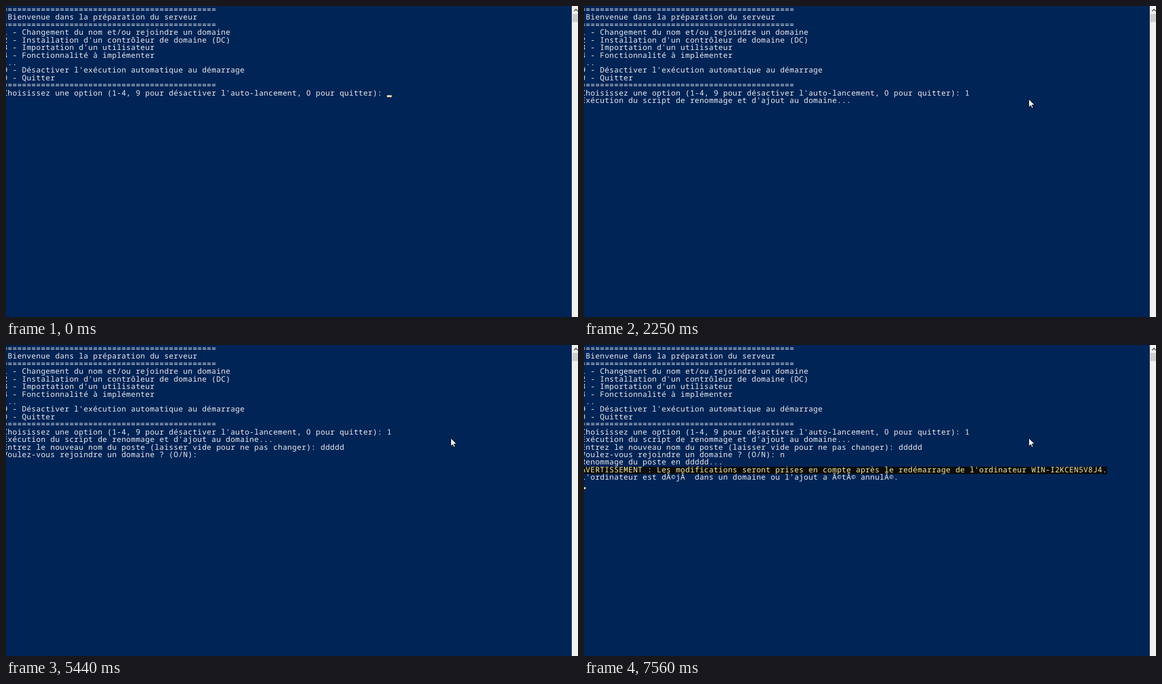
An HTML page that plays this animation: 1015x552 px, repeating every 8 s.

```html
<!DOCTYPE html>
<html lang="fr">
<head>
<meta charset="utf-8">
<title>Préparation du serveur</title>
<style>
  html, body { margin: 0; width: 100%; height: 100%; overflow: hidden; background: #012456; }
  svg { display: block; }
  text {
    font: 13.3px "Noto Sans Mono", "DejaVu Sans Mono", monospace;
    fill: #eeedf0;
    white-space: pre;
    text-rendering: geometricPrecision;
  }
  .zero { font-family: "Noto Sans", sans-serif; }
  .warn { fill: #f9f1a5; }
</style>
</head>
<body>
<svg width="1015" height="552" viewBox="0 0 1015 552">
  <rect width="1015" height="552" fill="#012456"/>
  <rect id="band" y="216" width="928" height="13" fill="#0c0c0c"/>
  <g id="rows"></g>
  <rect id="caret" height="3.4" fill="#fedba9"/>
  <g id="scrollbar">
    <rect x="1004" width="11" height="552" fill="#f0f0f0"/>
    <rect x="1005" y="14" width="10" height="14.5" fill="#cdcdcd"/>
    <path d="M1008 9.2L1011.3 5.9L1014.6 9.2" fill="none" stroke="#505050" stroke-width="1.6"/>
  </g>
  <path id="pointer" d="M0 0V14.3L3.4 11.1L5.5 16L7.6 15.1L5.5 10.3H10.1Z"
        fill="#fff" stroke="#000" stroke-width=".8"/>
</svg>
<script>
const LOOP = 8000;
const CELL = 8.412, LINE = 13.43, LEFT = -5.35, TOP = 0.5;
const WARN_ROW = 16;
const RULE = "=".repeat(45);

const menu = [
  RULE,
  " Bienvenue dans la préparation du serveur",
  RULE,
  "1 - Changement du nom et/ou rejoindre un domaine",
  "2 - Installation d'un contrôleur de domaine (DC)",
  "3 - Importation d'un utilisateur",
  "4 - Fonctionnalité à implémenter",
  "...",
  "9 - Désactiver l'exécution automatique au démarrage",
  "0 - Quitter",
  RULE,
  "Choisissez une option (1-4, 9 pour désactiver l'auto-lancement, 0 pour quitter): "
];
const choice = menu[11];
const rename = "Entrez le nouveau nom du poste (laisser vide pour ne pas changer): ";
const join = "Voulez-vous rejoindre un domaine ? (O/N): ";

// time, row, text of that row (null keeps it), caret row (null hides, caret sits after the text)
const steps = [
  [0, 11, choice, 11],
  [130, 11, null, null],
  [660, 11, null, 11],
  [990, 11, choice + "1", 11],
  [1190, 11, null, null],
  [1260, 12, "Exécution du script de renommage et d'ajout au domaine...", 13],
  [2250, 12, null, null],
  [2450, 13, rename, 13],
  [3310, 13, null, null],
  [3710, 13, rename + "d", 13],
  [3910, 13, rename + "dd", 13],
  [4040, 13, rename + "ddd", 13],
  [4170, 13, rename + "dddd", 13],
  [4240, 13, rename + "ddddd", 13],
  [4310, 13, null, null],
  [4440, 13, null, 14],
  [4510, 14, join, 14],
  [5440, 14, null, null],
  [5840, 14, join + "n", 14],
  [5970, 14, null, null],
  [6040, 15, "Renommage du poste en ddddd...", null],
  [6170, 15, null, 16],
  [6300, WARN_ROW, "AVERTISSEMENT : Les modifications seront prises en compte après le redémarrage de l'ordinateur WIN-I2KCEN5V8J4.", null],
  [6370, 17, "L'ordinateur est dÃ©jÃ\u00a0 dans un domaine ou l'ajout a Ã©tÃ© annulÃ©.", 18],
  [7030, 17, null, null],
  [7560, 17, null, 18]
];

// time, x, y of the pointer tip
const moves = [
  [70, 899, 477],
  [130, 868, 392],
  [200, 822, 262],
  [260, 797, 189],
  [330, 789.4, 165.4]
];

const byId = id => document.getElementById(id);
const make = (tag, owner) =>
  owner.appendChild(document.createElementNS("http://www.w3.org/2000/svg", tag));
const band = byId("band"), caret = byId("caret"), pointer = byId("pointer");
const show = (el, on) => el.setAttribute("visibility", on ? "visible" : "hidden");
const colX = col => LEFT + col * CELL;
const rowY = row => TOP + row * LINE;

const rows = Array.from({ length: 19 }, (_, r) => {
  const el = make("text", byId("rows"));
  el.setAttribute("y", rowY(r) + 10.5);
  if (r === WARN_ROW) el.setAttribute("class", "warn");
  return { el, text: "" };
});

function write(row, text) {
  if (row.text === text) return;
  row.text = text;
  row.el.textContent = "";
  row.el.setAttribute("x", [...text].map((_, i) => colX(i).toFixed(2)).join(" "));
  for (const part of text.split(/(0)/).filter(Boolean)) {
    const span = make("tspan", row.el);
    span.textContent = part;
    if (part === "0") span.setAttribute("class", "zero");
  }
}

function draw(t) {
  const lines = menu.slice();
  let caretRow = null;
  for (const [at, row, text, next] of steps) {
    if (at > t) break;
    if (text !== null) lines[row] = text;
    caretRow = next;
  }
  rows.forEach((row, i) => write(row, lines[i] || ""));
  show(band, lines[WARN_ROW]);

  show(caret, caretRow !== null);
  if (caretRow !== null) {
    caret.setAttribute("x", colX((lines[caretRow] || "").length));
    caret.setAttribute("y", rowY(caretRow) + 10.1);
    caret.setAttribute("width", CELL);
  }

  const move = moves.filter(m => m[0] <= t).pop();
  show(pointer, move);
  if (move) pointer.setAttribute("transform", `translate(${move[1]} ${move[2]})`);
}

const start = performance.now();
function tick() {
  draw((performance.now() - start) % LOOP);
  requestAnimationFrame(tick);
}
tick();
</script>
</body>
</html>
```
